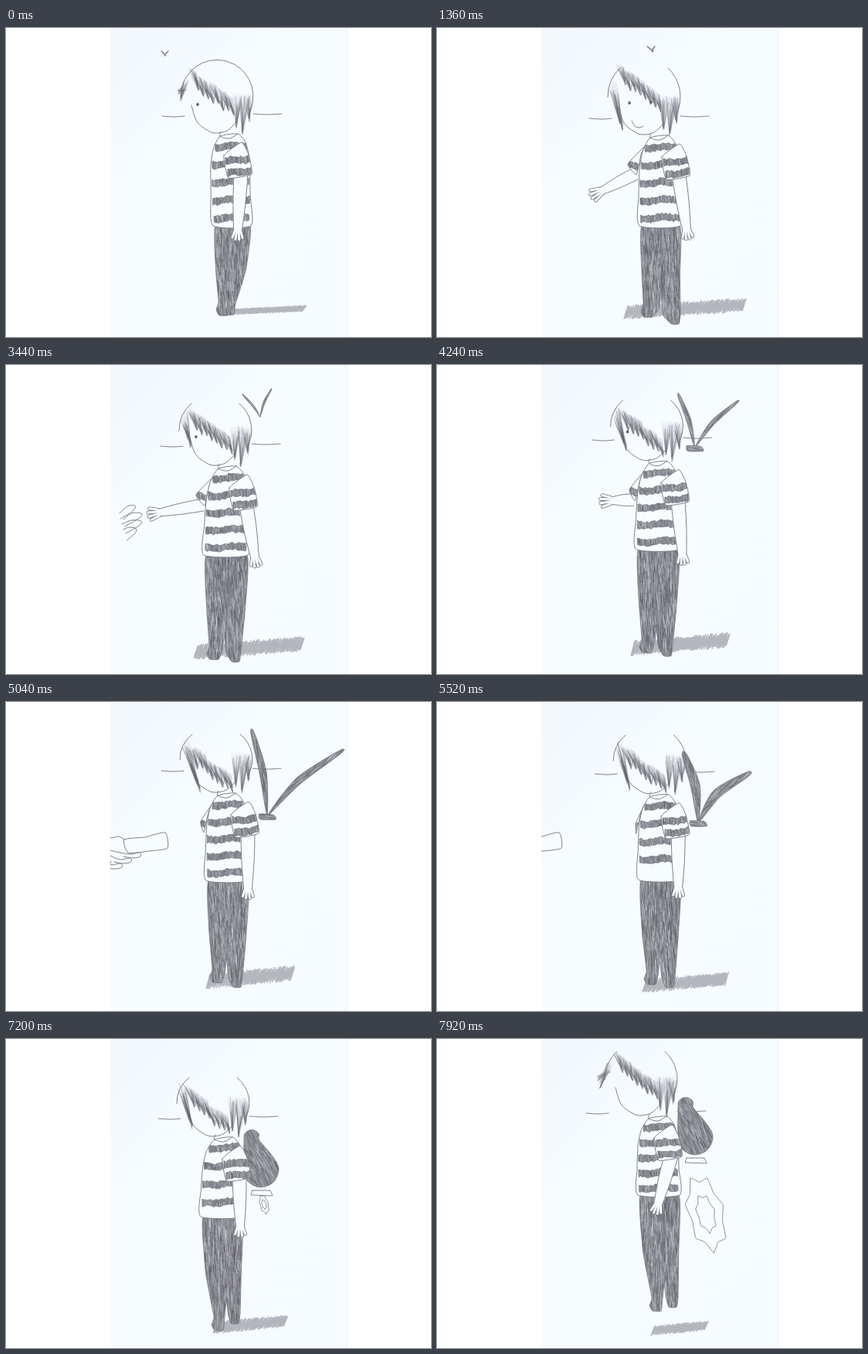
Write an HTML page with a canvas that moves like this. It is 550x400 px and loops after 8 s.

```html
<!DOCTYPE html>
<html lang="en">
<head>
<meta charset="utf-8">
<title>Pencil flipbook</title>
<style>
html, body { margin: 0; width: 100%; height: 100%; overflow: hidden; background: #fff; }
canvas { display: block; width: 550px; height: 400px; }
</style>
</head>
<body>
<canvas id="stage" width="550" height="400"></canvas>
<script>
const ctx = document.getElementById('stage').getContext('2d');
const LOOP = 8000;
const PAPER = '#f7fcff';
const LINE = '#73737d';

// Moments at which a new drawing is shown
const STEPS = [0, 400, 480, 800, 1040, 1360, 2000, 2320, 2640, 2960, 3200, 3440,
  3760, 4240, 4560, 4800, 5040, 5280, 5520, 5760, 6000, 6240, 6480, 6720,
  6960, 7200, 7440, 7680, 7920];

// head: centre x, chin y, fringe height above chin   lock: tip relative to chin
// torso: neck x, waist left, waist right, waist y    arm: cuff x, wrist x, y
// feet: left x, y, right x, y                        shade: left, right, y, height
// look: facing, crown gap, stripe spacing            reach: wrist x, y, sleeve size
// bird: base x, y, wing offsets x, y, x, y, width
const rest = { pack: [332, 125], flame: [336, 200, 0, 0], bird: [338, 170, -16, -60, 20, -35, 16] };
const POSES = [
  { ...rest, t: 0, head: [273, 136, 37], lock: [-47, -41], look: [0, 0, 0.2], horizon: [114],
    torso: [277, 268, 317, 256], arm: [303, 300, 262], reach: [255, 190, 0],
    feet: [281, 372, 289, 371], shade: [292, 388, 365, 9], bird: [206, 36, -5, -6, 4, -6, 1] },
  { ...rest, t: 1360, head: [268, 138, 46], lock: [-28, -4], look: [1, 1, 0.2], horizon: [117],
    torso: [276, 262, 315, 256], arm: [312, 323, 261], reach: [213, 211, 1],
    feet: [273, 374, 307, 383], shade: [242, 400, 363, 20], bird: [279, 31, -7, -7, 3, -7, 1.3] },
  { ...rest, t: 3440, head: [271, 130, 29], lock: [-32, -22], look: [0, 1, 0.2], horizon: [105],
    torso: [275, 256, 313, 246], arm: [310, 322, 249], reach: [199, 191, 1],
    feet: [269, 381, 296, 384], shade: [243, 386, 366, 22], bird: [329, 67, -22, -28, 14, -35, 2.6] },
  { ...rest, t: 5040, head: [272, 117, 15], lock: [-21, 1], look: [0, 1, 0.2], horizon: [89],
    torso: [274, 259, 314, 231], arm: [312, 313, 242], reach: [254, 160, 0.6],
    feet: [273, 363, 298, 369], shade: [259, 373, 356, 22], bird: [338, 148, -19, -108, 94, -83, 9] },
  { ...rest, t: 6240, head: [280, 121, 18], lock: [-33, -8], look: [0, 1, 0.235], horizon: [99],
    torso: [278, 264, 317, 229], arm: [310, 311, 238], reach: [260, 160, 0],
    feet: [283, 369, 303, 369], shade: [276, 385, 373, 16] },
  { ...rest, t: 7200, head: [268, 126, 17], lock: [-27, -9], look: [0, 1, 0.235], horizon: [103],
    torso: [270, 252, 306, 230], arm: [301, 303, 243], reach: [250, 160, 0],
    feet: [275, 377, 295, 368], shade: [268, 365, 369, 18], pack: [318, 128], flame: [334, 214, 6, 13] },
  { ...rest, t: 7920, head: [264, 99, 36], lock: [-53, -35], look: [0, 1, 0.2], horizon: [96],
    torso: [274, 260, 314, 202], arm: [302, 286, 214], reach: [254, 130, 0],
    feet: [284, 352, 304, 347], shade: [277, 351, 374, 14], pack: [322, 86], flame: [348, 226, 25, 51] }
];

const mix = (a, b, k) => a + (b - a) * k;

function poseAt(t) {
  const i = Math.max(0, POSES.findLastIndex((p, j) => p.t <= t && j < POSES.length - 1));
  const a = POSES[i], b = POSES[i + 1], k = (t - a.t) / (b.t - a.t);
  const pose = {};
  for (const part in a) {
    if (part !== 't') pose[part] = a[part].map((v, j) => mix(v, b[part][j], k));
  }
  return pose;
}

let seed = 1;
function rnd() {
  seed = (seed + 0x6D2B79F5) | 0;
  let r = Math.imul(seed ^ (seed >>> 15), 1 | seed);
  r = (r + Math.imul(r ^ (r >>> 7), 61 | r)) ^ r;
  return ((r ^ (r >>> 14)) >>> 0) / 4294967296;
}
const jit = a => (rnd() - 0.5) * 2 * a;

// Spline through [x, y] points; tension 0 gives straight lines
function shape(p, closed, tension = 0.1) {
  const n = p.length;
  const at = i => p[closed ? (i + n) % n : Math.max(0, Math.min(n - 1, i))];
  const path = new Path2D();
  path.moveTo(...p[0]);
  for (let i = 0; i < (closed ? n : n - 1); i++) {
    const [a, b, c, d] = [at(i - 1), at(i), at(i + 1), at(i + 2)];
    path.bezierCurveTo(b[0] + (c[0] - a[0]) * tension, b[1] + (c[1] - a[1]) * tension,
      c[0] - (d[0] - b[0]) * tension, c[1] - (d[1] - b[1]) * tension, c[0], c[1]);
  }
  if (closed) path.closePath();
  return path;
}

function stroke(path, width = 0.9, color = LINE) {
  ctx.lineWidth = width;
  ctx.strokeStyle = color;
  ctx.stroke(path);
}
const curve = (...p) => stroke(shape(p, false, 0.17));
const line = (a, b, width, color) => stroke(shape([a, b], false, 0), width, color);

function solid(p, tension) {
  const path = shape(p, true, tension);
  ctx.fillStyle = PAPER;
  ctx.fill(path);
  stroke(path);
  return path;
}

// Pencil tone: grey base with short dark and light strokes
function hatch(p, angle, len, tension) {
  const path = shape(p, true, tension);
  const xs = p.map(q => q[0]), ys = p.map(q => q[1]);
  const x0 = Math.min(...xs), y0 = Math.min(...ys);
  const w = Math.max(...xs) - x0, h = Math.max(...ys) - y0;
  ctx.save();
  ctx.clip(path);
  ctx.fillStyle = '#8d8d95';
  ctx.fill(path);
  for (let i = 0; i < w * h / 10; i++) {
    const x = x0 + rnd() * w, y = y0 + rnd() * h, a = angle + jit(0.12);
    const dx = Math.cos(a) * len / 2, dy = Math.sin(a) * len / 2;
    line([x - dx, y - dy], [x + dx, y + dy], 0.8, rnd() < 0.6 ? 'rgba(75,75,83,.38)' : 'rgba(225,228,238,.4)');
  }
  ctx.restore();
  stroke(path, 0.8);
}

function stripe(clip, x1, x2, y, slope) {
  ctx.save();
  ctx.clip(clip);
  const top = [], bottom = [];
  for (let x = x1; x <= x2; x += 2.5) {
    const mid = y + (x - x1) * slope + Math.sin(x / 6);
    top.push([x, mid - 4.2 + jit(1.1)]);
    bottom.unshift([x, mid + 4.2 + jit(1.1)]);
  }
  hatch([...top, ...bottom], 1.45, 7, 0.1);
  ctx.restore();
}

function hand(x, y, angle, len, spread = 0.2) {
  for (const [width, color] of [[4.6, LINE], [3, PAPER]]) {
    for (let i = -1.5; i <= 1.5; i++) {
      const a = angle + i * spread, l = len - Math.abs(i) * 2;
      const px = x - Math.sin(angle) * i * 2.4, py = y + Math.cos(angle) * i * 2.4;
      line([px, py], [px + Math.cos(a) * l, py + Math.sin(a) * l], width, color);
    }
  }
}

function limb(x0, y0, x1, y1, width, fingers) {
  const a = Math.atan2(y1 - y0, x1 - x0), nx = -Math.sin(a), ny = Math.cos(a);
  const side = (k, w) => [mix(x0, x1, k) + nx * w, mix(y0, y1, k) + ny * w];
  hand(x1, y1, a, fingers);
  const rim = [side(0, width), side(0.5, width * 0.9), side(1, width * 0.6)];
  const back = [side(1, -width * 0.6), side(0.5, -width * 0.9), side(0, -width)];
  ctx.fillStyle = PAPER;
  ctx.fill(shape([...rim, ...back], true));
  curve(...rim);
  curve(...back);
}

// Lock of hair that fades in towards its tip
function tuft(x, y, w, drop, tx, ty) {
  const g = ctx.createLinearGradient(x + w / 2, y, tx, ty);
  g.addColorStop(0, 'rgba(125,125,137,0)');
  g.addColorStop(0.4, 'rgba(125,125,137,.3)');
  g.addColorStop(1, 'rgba(125,125,137,.5)');
  ctx.fillStyle = g;
  ctx.fill(shape([[x, y], [x + w, y + drop], [tx, ty]], true, 0.04));
  for (let i = 0; i < 11; i++) {
    const u = rnd(), k = rnd() * 0.55;
    line([mix(x + w * u, tx, k), mix(y + drop * u, ty, k)], [tx + jit(1), ty - rnd() * 8], 0.7, 'rgba(95,95,106,.4)');
  }
}

function paper() {
  ctx.fillStyle = '#fff';
  ctx.fillRect(0, 0, 550, 400);
  const g = ctx.createLinearGradient(135, 0, 440, 300);
  g.addColorStop(0, '#f2f7ff');
  g.addColorStop(0.4, PAPER);
  g.addColorStop(1, '#f6fcff');
  ctx.fillStyle = g;
  ctx.fillRect(135, 0, 307, 400);
  line([441, 0], [441, 400], 0.8, '#e6eaf6');
}

function scribble([x0, x1, y, h]) {
  const p = [];
  for (let x = x0; x < x1 - 4; x += 1.5) {
    const mid = y + (0.5 - (x - x0) / (x1 - x0)) * h * 0.5, half = h * (0.32 + rnd() * 0.14);
    p.push([x, mid + half], [x + 5, mid - half]);
  }
  stroke(shape(p, false, 0), 1.3, 'rgba(115,115,125,.5)');
}

function bird([x, y, lx, ly, rx, ry, w]) {
  for (const [dx, dy, bend] of [[lx, ly, w * 0.45], [rx, ry, -w * 0.75]]) {
    const d = Math.hypot(dx, dy), nx = -dy / d * w / 2, ny = dx / d * w / 2;
    const mx = x + dx / 2 + bend, my = y + dy / 2 - Math.abs(bend) * 0.6;
    hatch([[x, y], [mx + nx, my + ny], [x + dx + nx / 2, y + dy + ny / 2],
      [x + dx - nx / 2, y + dy - ny / 2], [mx - nx, my - ny]], Math.atan2(dy, dx), 10, 0.14);
  }
  if (w > 5) hatch([[x - 10, y - 3], [x + 8, y - 2], [x + 11, y + 4], [x - 9, y + 4]], 0.2, 8);
}

function jetpack([x, y], [fx, fy, rx, ry]) {
  const arc = (cx, cy, r, from, to) => Array.from({ length: 6 }, (_, i) => {
    const a = mix(from, to, i / 5);
    return [cx + Math.cos(a) * r, cy + Math.sin(a) * r];
  });
  const bx = x + 12, by = y + 41;
  hatch([...arc(x, y, 10.5, 2.8, 6.6), ...arc(bx, by, 23, -0.9, 3.4)], 1.1, 9, 0.16);
  if (rx < 2) return;
  solid([[bx - 11, by + 27], [bx + 12, by + 27], [bx + 15, by + 34], [bx - 13, by + 33]], 0);
  for (const size of [1, 0.5]) {
    const p = [];
    for (let i = 0; i < 14; i++) {
      const a = i / 14 * Math.PI * 2 + Math.PI / 2, r = (i % 2 ? 0.8 : 1) * size;
      const dy = Math.sin(a) * ry * r;
      p.push([fx + Math.cos(a) * rx * r + dy * 0.2, fy + dy]);
    }
    stroke(shape(p, true, 0.04), 0.8);
  }
}

function legs([, left, right, y], [lx, ly, rx, ry]) {
  const knee = (x, foot, k) => mix(x, foot, k);
  const cx = (lx + rx) / 2, cy = Math.min(ly, ry) - 30;
  const gap = Math.min(5, (rx - lx) / 4);
  hatch([[left + 3, y], [knee(left + 3, lx - 8, 0.3), mix(y, ly, 0.5)], [lx - 6, ly - 18], [lx - 9, ly - 7],
    [lx - 5, ly], [lx + 6, ly], [cx - gap / 2, ly - 12], [cx, cy], [cx + gap / 2, ry - 12], [rx - 4, ry],
    [rx + 6, ry], [rx + 8, ry - 14], [knee(right - 1, rx + 8, 0.3), mix(y, ry, 0.5)], [right - 1, y]], 1.54, 12, 0.07);
}

function shirt([nx, left, right, waist], ny, spacing) {
  const h = waist - ny;
  const edge = k => [mix(nx, left, k) - 9 * Math.sin(Math.PI * k ** 0.6), ny + h * k];
  const front = [0, 0.15, 0.35, 0.65, 1].map(edge);
  const clip = solid([...front, [right, waist], [right - 1, waist - h * 0.35],
    [nx + 38, ny + 30], [nx + 33, ny + 8], [nx + 23, ny - 3]]);
  for (let k = 0.12; k < 0.96; k += spacing) stripe(clip, edge(k)[0] + 2, right - 1, ny + h * k, -0.05);
  curve([nx + 1, ny - 6], [nx, ny], [nx + 12, ny + 3], [nx + 23, ny - 3]);
}

function sleeve(x, ny) {
  const clip = solid([[x - 21, ny + 25], [x - 15, ny + 54], [x + 15, ny + 49], [x + 11, ny + 24], [x + 2, ny + 8]], 0.07);
  stripe(clip, x - 19, x + 14, ny + 33, -0.13);
  stripe(clip, x - 16, x + 15, ny + 48, -0.13);
}

function head([cx, chin, fringe], [lockX, lockY], [facing, gap]) {
  const ry = (80 + fringe * 0.4) / 2, cy = chin - ry;
  for (const [dir, end] of [[-1, 0.02], [1, 0.5]]) {
    const crown = new Path2D();
    const bottom = Math.PI / 2 - dir * (Math.PI / 2 - end);
    crown.ellipse(cx, cy, 47, ry, 0, bottom, -Math.PI / 2 + dir * gap * 0.72, dir > 0);
    stroke(crown);
  }
  curve([cx - 33, chin - 36], [cx - 26, chin - 15], [cx - 13, chin - 4], [cx - 2, chin], [cx + 13, chin - 3], [cx + 24, chin - 13]);

  tuft(cx - 44, chin - 70, 9, 2, cx + lockX, chin + lockY);
  tuft(cx - 46, chin - 62, 8, 6, cx + lockX - 3, chin + lockY - 9);
  const edge = [];
  for (let dx = -24; dx <= 23; dx += 6.5) {
    const x = cx + dx, y = chin - fringe + dx * 0.75 + jit(3);
    tuft(x - 15, y - 31, 13, 8, x, y);
    edge.push([x - 4, y - 13], [x, y]);
  }
  stroke(shape(edge, false, 0.03), 0.7);
  tuft(cx + 19, chin - 52, 14, 4, cx + 25, chin - 6);
  tuft(cx + 28, chin - 52, 16, 2, cx + 33, chin + 2);
  tuft(cx + 33, chin - 50, 14, 2, cx + 42, chin - 14);

  if (fringe < 21 || cy < 60) return;
  const dots = [[cx - 25 + facing * 6, chin - 37 - facing * 4]];
  if (facing > 0.5) {
    dots.push([cx + 9, chin - 42]);
    curve([cx - 16, chin - 18], [cx - 12, chin - 11], [cx - 6, chin - 9], [cx - 1, chin - 11]);
  }
  ctx.fillStyle = '#5a5a64';
  for (const [x, y] of dots) {
    ctx.beginPath();
    ctx.ellipse(x, y, 1.7, 2.1, 0, 0, 7);
    ctx.fill();
  }
}

// Another hand slides in from the left, first open, later holding a card
function visitor(t) {
  const card = t > 4500;
  const away = Math.abs(t - (card ? 5040 : 3440)) / 10;
  if (away > 85) return;
  ctx.save();
  ctx.beginPath();
  ctx.rect(135, 0, 400, 400);
  ctx.clip();
  ctx.translate(-away, 0);
  if (card) {
    solid([[153, 178], [180, 175], [206, 169], [209, 189], [185, 193], [158, 195]]);
    curve([85, 180], [135, 176], [145, 174], [153, 178]);
    for (let i = 0; i < 3; i++) {
      const y = 194 + i * 7, x = 172 - i * 12;
      curve([134 + i, y - 2], [x - 12, y + 3], [x, y + 1], [x + 2, y + 6], [x - 8, y + 8], [x - 20, y + 6]);
    }
  } else {
    for (let i = 0; i < 4; i++) {
      const x = 147 + i * 1.5, y = 192 + i * 7, dx = 20 + Math.sin(i * 1.2) * 7;
      curve([x, y], [x + dx * 0.5, y - 9 + i * 2], [x + dx, y - 10 + i * 3], [x + dx * 0.9, y - 4 + i * 3], [x + 5, y + 8 + i * 2]);
    }
  }
  ctx.restore();
}

function draw(t) {
  seed = t + 17;
  const f = poseAt(t);
  const [cx, chin] = f.head, ny = chin + 4, nx = f.torso[0];
  const [armX, wristX, wristY] = f.arm, [reachX, reachY, out] = f.reach, hz = f.horizon[0];
  ctx.lineCap = ctx.lineJoin = 'round';
  paper();
  curve([cx - 71, hz], [cx - 55, hz + 1], [cx - 42, hz]);
  curve([cx + 47, hz - 3], [cx + 65, hz - 2], [cx + 84, hz - 3]);
  scribble(f.shade);
  if (t < 5700) bird(f.bird);
  else jetpack(f.pack, f.flame);

  if (nx - 22 - reachX > 14) limb(nx - 20, ny + 47, reachX, reachY, 8, 16);
  legs(f.torso, f.feet);
  if (out > 0.3) {
    const cap = solid([[nx - 8, ny + 12], [nx - 12 - 17 * out, ny + 34], [nx - 18, ny + 48], [nx - 12, ny + 22]], 0.07);
    stripe(cap, nx - 34, nx - 10, ny + 32, 0.4);
  }
  shirt(f.torso, ny, f.look[2]);
  limb(armX + 1, ny + 48, wristX, wristY, 9, 13);
  sleeve(armX, ny);
  head(f.head, f.lock, f.look);
  visitor(t);
}

let shown = -1;
const start = performance.now();
function tick(now) {
  const t = Math.max(0, now - start) % LOOP;
  const step = STEPS.findLast(s => s <= t);
  if (step !== shown) draw(shown = step);
  requestAnimationFrame(tick);
}
draw(shown = 0);
requestAnimationFrame(tick);
</script>
</body>
</html>
```
